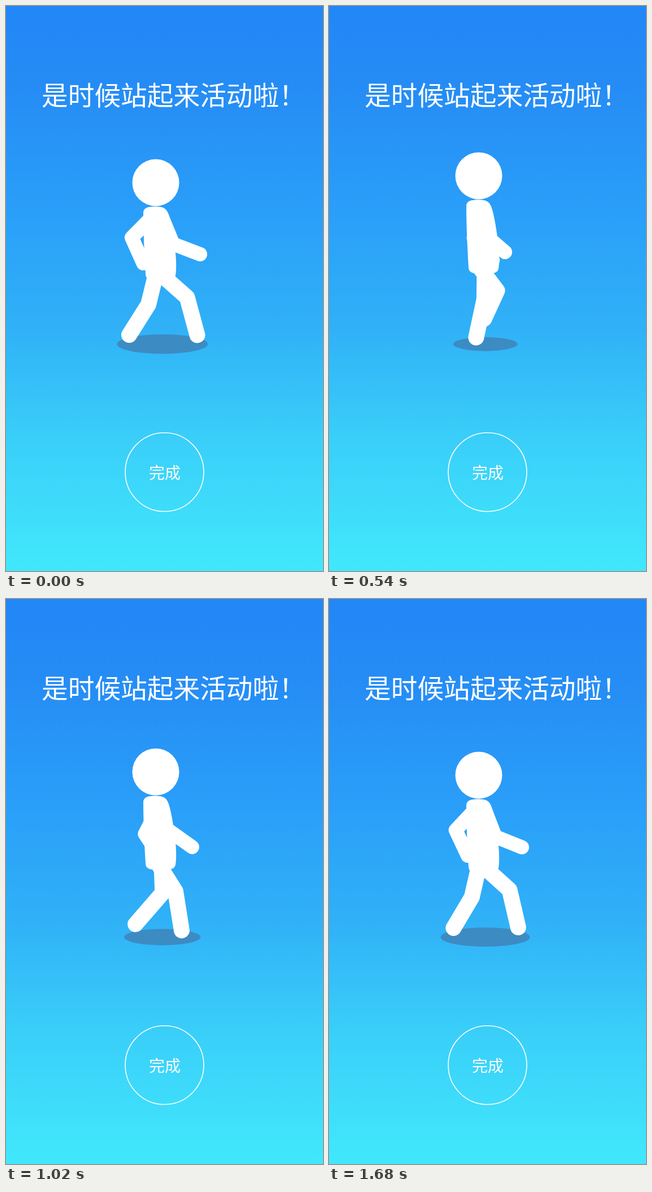
These frames come from a looping animation (561 by 998 pixels, 1700 ms). An HTML page with a canvas:

```html
<!DOCTYPE html>
<html lang="zh-CN">
<head>
<meta charset="utf-8">
<title>活动提醒</title>
<style>
  html, body { margin: 0; width: 100%; height: 100%; overflow: hidden; }
  body {
    position: relative;
    background: linear-gradient(#2287f7 0, #258cf5 14%, #2a9ff9 37%, #30b1f7 57%, #3acff9 77%, #41e8fc 100%);
  }
  canvas, svg { position: absolute; left: 0; top: 0; display: block; }
  text { fill: #fff; font-family: "Noto Sans CJK SC", "Noto Sans CJK", sans-serif; }
</style>
</head>
<body>
<canvas id="stage" width="561" height="998"></canvas>
<svg width="561" height="998" viewBox="0 0 561 998">
  <text x="63" y="175" font-size="46.7">是时候站起来活动啦！</text>
  <circle cx="280.5" cy="823.3" r="69.5" fill="none" stroke="#fff" stroke-width="1.6"/>
  <text x="281" y="834.5" font-size="28" text-anchor="middle">完成</text>
</svg>
<script>
const ctx = document.getElementById('stage').getContext('2d');
const LOOP = 1700, STEP = 20, BOB = 16.5;

const mix = (a, b, f) => a.map((v, i) => v + (b[i] - v) * f);
// Triangle wave: 0 at whole numbers, 1 halfway between them.
const tri = p => 1 - Math.abs(1 - 2 * (p - Math.floor(p)));

// Both legs share one gait, half a loop apart; they differ in the
// reach of the rear foot and the depth of the foot as it swings past.
const midHip = [275.5, 480];
const legs = [
  { hip: [275.5, 475], start: 0, reach: -68, depth: 97 },
  { hip: [265, 474], start: 0.5, reach: -47, depth: 82.5 }
];

// Knee and foot offsets from the hip: front, planted, rear, swinging.
const gait = ({ reach, depth }) => [
  [45, 39.7, 63, 106.3],
  [4, 53.5, 4.5, 126.5],
  [-13, 53.3, reach, 107],
  [24, 39, -14, depth]
];

// Shoulder, elbow and hand at the two ends of each arm's swing.
const arms = [
  { from: [258, 373, 222.5, 409, 243, 454.5], to: [263.5, 373, 296, 411, 351, 442.3] },
  { from: [277, 375, 295.6, 420.3, 343.5, 438.5], to: [266.5, 378, 233.5, 422, 259, 474] }
];

const torso = new Path2D(
  'M243 366 C243 356 252 354.3 265 354.3 C279 354.3 283 358 286.5 365 ' +
  'C292 378 296 405 298 420 C301 440 302 460 300.5 472 C300 480 297 483 290 484 ' +
  'L256 484 C250 482 247.5 480 247 474 C245 440 243 400 243 366Z');

function limb([x0, y0, x1, y1, x2, y2], width) {
  ctx.lineWidth = width;
  ctx.beginPath();
  ctx.moveTo(x0, y0);
  ctx.lineTo(x1, y1);
  ctx.lineTo(x2, y2);
  ctx.stroke();
}

function drawLeg(leg, phase) {
  const beat = ((phase + leg.start) % 1) * 4, i = Math.floor(beat);
  const poses = gait(leg);
  const [kx, ky, fx, fy] = mix(poses[i], poses[(i + 1) % 4], beat - i);
  const [x, y] = mix(leg.hip, midHip, Math.max(0, 2 * tri(phase) - 1));
  limb([x, y, x + kx, y + ky, x + fx, y + fy], 28);
}

function ellipse(x, y, rx, ry, color) {
  ctx.fillStyle = color;
  ctx.beginPath();
  ctx.ellipse(x, y, rx, ry, 0, 0, Math.PI * 2);
  ctx.fill();
}

function draw(ms) {
  const phase = Math.floor((ms % LOOP) / STEP) * STEP / LOOP;
  const lift = tri(phase * 2);
  const size = 1 - 0.4 * lift;

  ctx.clearRect(0, 0, 561, 998);
  ellipse(276.7, 597.2, 80.4 * size, 17.2 * size, '#3d8bc3');

  ctx.save();
  ctx.translate(0, -BOB * lift);
  ctx.strokeStyle = '#fff';
  ctx.lineCap = ctx.lineJoin = 'round';
  for (const leg of legs) drawLeg(leg, phase);
  for (const { from, to } of arms) limb(mix(from, to, tri(phase)), 25);
  ellipse(265, 312, 41.5, 41.5, '#fff');
  ctx.fill(torso);
  ctx.restore();
}

const start = performance.now();
function tick() {
  draw(performance.now() - start);
  requestAnimationFrame(tick);
}
draw(0);
requestAnimationFrame(tick);
</script>
</body>
</html>
```
